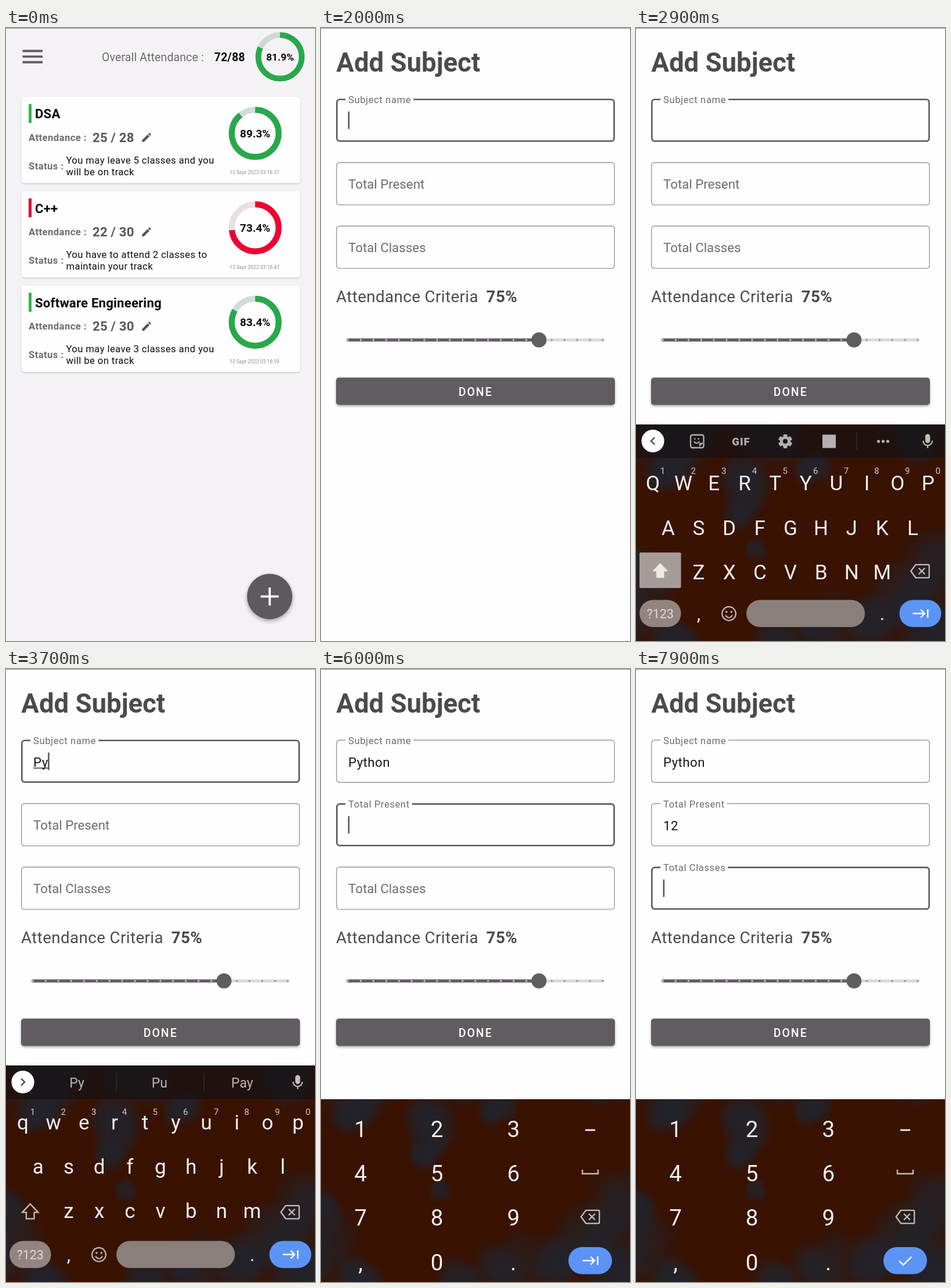
These frames come from a looping animation (532 px wide and 1053 px high, 8 s). An HTML page with a canvas:

```html
<!DOCTYPE html>
<html lang="en">
<head>
<meta charset="utf-8">
<title>Attendance tracker</title>
<style>
  html, body { margin: 0; width: 100%; height: 100%; overflow: hidden; background: #fefdff; }
  canvas { display: block; width: 532px; height: 1053px; }
</style>
</head>
<body>
<canvas id="stage" width="532" height="1053"></canvas>
<script>
const W = 532, H = 1053, LOOP = 8000;
const ctx = document.getElementById('stage').getContext('2d');
const GREY = '#605c5f', GREEN = '#28a84a', RED = '#f00030', KEY = '#f4f0ef', DIM = '#c6bdba';

// Timeline, in ms
const OPEN = 1300, FOCUS_NAME = 1800, KEYBOARD = 2150, FOCUS_PRESENT = 5550, FOCUS_CLASSES = 7550;
const NAME_KEYS = [3250, 3600, 3900, 4150, 4400, 4650];
const PRESENT_KEYS = [6550, 6950];

const progress = (t, start, length) => Math.min(1, Math.max(0, (t - start) / length));
const easeOut = p => 1 - (1 - p) ** 3;
const mix = (a, b, p) => a + (b - a) * p;

function text(str, x, y, size, color, { weight = 400, ls = 0, align = 'left' } = {}) {
  ctx.font = `${weight} ${size}px Roboto, sans-serif`;
  ctx.letterSpacing = ls + 'px';
  ctx.textAlign = align;
  ctx.fillStyle = color;
  ctx.fillText(str, x, y);
  return ctx.measureText(str).width;
}

function box(x, y, w, h, r, color) {
  ctx.beginPath();
  ctx.roundRect(x, y, w, h, r);
  ctx.fillStyle = color;
  ctx.fill();
}

function disc(x, y, r, color) {
  ctx.beginPath();
  ctx.arc(x, y, r, 0, 7);
  ctx.fillStyle = color;
  ctx.fill();
}

function arc(x, y, r, from, to, width, color) {
  ctx.beginPath();
  ctx.arc(x, y, r, from, to);
  ctx.lineWidth = width;
  ctx.strokeStyle = color;
  ctx.stroke();
}

function shadowed(color, blur, dy, draw) {
  ctx.save();
  ctx.shadowColor = color;
  ctx.shadowBlur = blur;
  ctx.shadowOffsetY = dy;
  draw();
  ctx.restore();
}

// Path on a 24-unit grid centred at x, y; stroked when a width is given
function icon(d, x, y, scale, color, width) {
  ctx.save();
  ctx.translate(x, y);
  ctx.scale(scale, scale);
  ctx.translate(-12, -12);
  ctx.fillStyle = ctx.strokeStyle = color;
  ctx.lineWidth = width;
  const path = new Path2D(d);
  width ? ctx.stroke(path) : ctx.fill(path);
  ctx.restore();
}

const PENCIL = 'M3 17.25V21h3.75L17.8 9.95l-3.75-3.75zM20.7 7.05q.7-.7 0-1.4l-2.35-2.35q-.7-.7-1.4 0l-1.8 1.8 3.75 3.75z';
const BACKSPACE = 'M7 4.5H21.5Q22.5 4.5 22.5 5.5V18.5Q22.5 19.5 21.5 19.5H7L1.5 12ZM10.5 8.5l7 7M17.5 8.5l-7 7';
const SHIFT = 'M12 4L4 12.5H8V19H16V12.5H20Z';
const TAB = 'M2.5 12H17.5M12.5 7l5 5-5 5M21.5 6.5V17.5';
const CHECK = 'M4.5 12.5l5 5L20 7';

// ---------- Home screen ----------

function ring(x, y, r, width, value, color, track, size) {
  const top = -Math.PI / 2;
  arc(x, y, r, 0, Math.PI * 2, width, track);
  arc(x, y, r, top, top + Math.PI * 2 * value / 100, width, color);
  text(value.toFixed(1) + '%', x, y + size * 0.355, size, '#0c0c0c', { weight: 700, align: 'center' });
}

const SUBJECTS = [
  ['DSA', '25 / 28', 89.3, 'You may leave 5 classes and you', 'will be on track', '16:37'],
  ['C++', '22 / 30', 73.4, 'You have to attend 2 classes to', 'maintain your track', '16:47'],
  ['Software Engineering', '25 / 30', 83.4, 'You may leave 3 classes and you', 'will be on track', '18:09'],
];

function card([name, count, value, line1, line2, time], top) {
  const low = value < 75;
  ctx.save();
  ctx.translate(0, top);
  shadowed('rgba(0,0,0,.2)', 3, 1.3, () => box(26.5, 0, 480, 148.5, 5, '#fefefe'));
  box(39, 12.5, 5, 32.5, 0, low ? '#e3092f' : '#3cb34a');
  text(name, 50, 37.4, 22.17, '#0c0c0c', { weight: 700, ls: 0.2 });
  const label = { weight: 700, ls: 0.45 };
  text('Attendance :', 39, 76, 16.6, '#6d6b6e', label);
  text(count, 149, 78, 22.17, '#59575a', { weight: 700, ls: 0.2 });
  icon(PENCIL, 242, 70, 0.86, '#59575a');
  text('Status :', 39, 125, 16.6, '#6d6b6e', label);
  text(line1, 103.5, 115, 16.6, '#0c0c0c', { ls: 0.42 });
  text(line2, 103.5, 135, 16.6, '#0c0c0c', { ls: 0.42 });
  ring(429, 63, 40.4, 10.2, value, low ? RED : GREEN, low ? '#e9dfe1' : '#d2dcd6', 19);
  text('13 Sept 2022 03:' + time, 385, 133.3, 8.3, '#8c8a8d', { ls: 0.14 });
  ctx.restore();
}

function home() {
  ctx.fillStyle = '#f4f2f5';
  ctx.fillRect(0, 0, W, H);
  for (const y of [37.6, 47.2, 56.8]) box(28.5, y, 34.5, 3.9, 0, '#605e61');
  text('Overall Attendance :', 165, 57, 19.4, '#6b696c', { ls: 0.18 });
  text('72/88', 358.5, 57, 19.4, '#0c0c0c', { weight: 700, ls: 0.3 });
  ring(471.8, 49.5, 37.4, 9.8, 81.9, GREEN, '#cfd9d3', 17.4);
  SUBJECTS.forEach((subject, i) => card(subject, 118 + i * 162.2, i));
  shadowed('rgba(0,0,0,.35)', 7, 3, () => disc(454, 976.5, 39, '#5d5a5d'));
  box(438.5, 974.6, 31, 3.8, 0, '#fff');
  box(452.1, 961, 3.8, 31, 0, '#fff');
}

// ---------- Form ----------

function field({ label, top, value, focusAt, blurAt, composing, caretFrom }, t) {
  const focused = t >= focusAt && t < blurAt;
  const float = easeOut(progress(t, focusAt, 160));
  const line = focused ? 2.6 : 1.4;
  ctx.beginPath();
  ctx.roundRect(26 + line / 2, top + line / 2, 480 - line, 74 - line, 5);
  ctx.lineWidth = line;
  ctx.strokeStyle = focused ? '#5a585b' : '#98969a';
  ctx.stroke();

  const size = mix(22.25, 16.6, float), ls = 0.6 * float;
  if (float > 0) {
    ctx.font = `400 16.6px Roboto, sans-serif`;
    ctx.letterSpacing = '0.6px';
    const gap = ctx.measureText(label).width + 9;
    box(42 + gap / 2 * (1 - float), top - 1, gap * float, 5, 0, '#fefdff');
  }
  text(label, 47, top + mix(45, 7.6, float), size, '#6d6b6e', { ls });

  let width = 0;
  if (value) {
    width = text(value, 47, top + 46, 22.17, '#161616', { ls: 0.5 });
    if (composing && focused) box(47, top + 48, width, 1.5, 0, '#333');
  }
  if (focused && (t - caretFrom + LOOP) % 1000 < 500) box(46.5 + width, top + 22, 2.6, 30, 0, '#5a585b');
}

function slider() {
  const y = 535.8, thumb = 375.3;
  box(44, y - 2.6, 444, 5.2, 2.6, '#dbd9dc');
  box(44, y - 2.6, thumb - 44, 5.2, 2.6, GREY);
  for (let i = 0; i <= 20; i++) disc(46.4 + i * 21.93, y, 1.6, i < 15 ? '#d4d2d5' : '#8b898c');
  disc(thumb, y, 13, GREY);
}

const typed = (word, times, t) => word.slice(0, times.filter(k => t >= k).length);
const lastBefore = (times, t) => Math.max(...times.filter(k => t >= k));

function form(t, name, present) {
  ctx.fillStyle = '#fefdff';
  ctx.fillRect(0, 0, W, H);
  text('Add Subject', 26.3, 75.3, 45.5, '#4c4a4d', { weight: 700 });
  field({
    label: 'Subject name', top: 121.5, value: name, composing: true,
    focusAt: FOCUS_NAME, blurAt: FOCUS_PRESENT, caretFrom: lastBefore([-60, 1940, ...NAME_KEYS], t),
  }, t);
  field({
    label: 'Total Present', top: 230.6, value: present,
    focusAt: FOCUS_PRESENT, blurAt: FOCUS_CLASSES, caretFrom: lastBefore([0, FOCUS_PRESENT, ...PRESENT_KEYS], t),
  }, t);
  field({
    label: 'Total Classes', top: 339.6, value: '',
    focusAt: FOCUS_CLASSES, blurAt: Infinity, caretFrom: FOCUS_CLASSES,
  }, t);
  text('Attendance Criteria', 26, 471, 27.7, '#4c4a4d', { ls: 0.42 });
  text('75%', 284.6, 471, 27.7, '#4c4a4d', { weight: 700, ls: 0.42 });
  slider();
  shadowed('rgba(0,0,0,.35)', 4, 2, () => box(26, 600.5, 480, 47, 5, GREY));
  text('DONE', 236.8, 632, 19.4, '#fff', { weight: 500, ls: 2 });
}

// ---------- Keyboard ----------

// Soft dark clouds over brown, painted once
const backdrop = (() => {
  const canvas = document.createElement('canvas');
  canvas.width = W;
  canvas.height = H;
  const c = canvas.getContext('2d');
  let seed = 7;
  const random = () => (seed = seed * 16807 % 2147483647) / 2147483647;
  c.fillStyle = '#391202';
  c.fillRect(0, 0, W, H);
  const clouds = [[60, 755, 45], [185, 780, 50], [185, 835, 36], [300, 755, 36], [205, 895, 20],
    [505, 930, 60], [465, 975, 65], [515, 1030, 70], [400, 1020, 55], [320, 1020, 50],
    [15, 930, 42], [5, 1000, 60], [60, 1045, 50], [240, 1045, 40], [60, 700, 90], [220, 700, 70], [470, 700, 60]];
  for (const [x, y, r] of clouds) {
    for (let i = 0; i < 7; i++) {
      const px = x + (random() - 0.5) * r, py = y + (random() - 0.5) * r, pr = r * (0.5 + random() * 0.4);
      const g = c.createRadialGradient(px, py, 0, px, py, pr);
      g.addColorStop(0, 'rgba(34,35,43,.55)');
      g.addColorStop(0.5, 'rgba(34,35,43,.35)');
      g.addColorStop(1, 'rgba(34,35,43,0)');
      c.fillStyle = g;
      c.fillRect(px - pr, py - pr, pr * 2, pr * 2);
    }
  }
  return canvas;
})();

const panel = top => ctx.drawImage(backdrop, 0, top, W, H - top, 0, top, W, H - top);
const key = (str, x, y, size = 35, color = KEY) => text(str, x, y, size, color, { align: 'center' });

function actionKey(x, y, w, path) {
  box(x, y, w, 46.5, 23.2, '#5c94f6');
  icon(path, x + w / 2, y + 23.3, 1.35, '#fff', 1.8);
}

function face(x, y, r, color) {
  disc(x - r * 0.36, y - r * 0.25, r * 0.15, color);
  disc(x + r * 0.36, y - r * 0.25, r * 0.15, color);
  arc(x, y + r * 0.05, r * 0.52, 0.3, Math.PI - 0.3, 2, color);
}

function mic() {
  box(498, 697.5, 8.4, 15.5, 4.2, DIM);
  arc(502.2, 709, 8, 0, Math.PI, 2.2, DIM);
  box(501.1, 717, 2.2, 4.5, 0, DIM);
}

function tools() {
  const c = '#b5afb0';
  ctx.beginPath();
  ctx.roundRect(94, 699, 22.5, 22, 3);
  ctx.lineWidth = 2.3;
  ctx.strokeStyle = c;
  ctx.stroke();
  icon('M23 15L16 22V16Q16 15 17 15Z', 105, 709.5, 1, c);
  face(104.5, 708, 9, c);
  text('GIF', 181, 716.5, 18.5, c, { weight: 900, ls: 1, align: 'center' });
  for (let i = 0; i < 6; i++) {
    ctx.save();
    ctx.translate(257, 710);
    ctx.rotate(i * Math.PI / 3);
    box(-3.4, -12, 6.8, 7, 1, c);
    ctx.restore();
  }
  arc(257, 710, 6.6, 0, 7, 5, c);
  box(321, 698.5, 23, 23, 0, c);
  box(379.5, 695, 1, 30, 0, '#3b3433');
  for (const x of [417.5, 425.5, 433.5]) disc(x, 710, 2.6, c);
}

const SUGGESTIONS = {
  1: ['P', 'Pa', 'Po'], 2: ['Py', 'Pu', 'Pay'], 3: ['Pyt', 'Python', 'Put'],
  4: ['Pyth', 'Python', 'Path'], 5: ['Pytho', 'Python', 'Photo'], 6: ['', 'Python', ''],
};

function suggestions(count) {
  const words = SUGGESTIONS[count];
  words.forEach((word, i) => key(word, 122 + i * 142.3, 719, 23, '#bcb4b3'));
  if (words[0]) for (const x of [189.5, 340.5]) box(x, 694, 1, 31, 0, '#3b3433');
}

function letters(count) {
  const upper = count === 0;
  panel(681);
  ctx.fillStyle = 'rgba(20,18,20,.66)';
  ctx.fillRect(0, 681, W, 58);

  disc(29, 709.5, 19.6, '#fff');
  icon(upper ? 'M15 6l-6 6 6 6' : 'M9 6l6 6-6 6', 29, 709.5, 1, '#444', 2.3);
  upper ? tools() : suggestions(count);
  mic();

  const rows = [['qwertyuiop', 29], ['asdfghjkl', 55.3], ['zxcvbnm', 108]];
  rows.forEach(([row, left], r) => [...row].forEach((ch, i) => {
    const x = left + i * 52.65, y = (upper ? 794.3 : 791) + r * 76.2;
    key(upper ? ch.toUpperCase() : ch, x, y);
    if (r === 0) key(String((i + 1) % 10), x + 17, 765.5, 15, '#d3cac7');
  }));

  if (upper) {
    box(6, 901, 71.5, 61, 2, '#a59b98');
    icon(SHIFT, 41.7, 932.5, 1.7, '#efe9e7');
  } else {
    icon(SHIFT, 41.7, 932.5, 1.7, DIM, 1.35);
  }
  icon(BACKSPACE, 489, 933, 1.5, DIM, 1.5);

  box(6, 982.5, 71.5, 46.5, 23.2, '#92847f');
  key('?123', 41.7, 1014, 21.5, '#e2dad7');
  key(',', 108, 1017, 32);
  arc(160, 1006, 11.8, 0, 7, 2.2, DIM);
  face(160, 1006, 11.8, DIM);
  box(190, 982.5, 204, 46.5, 23.2, '#8b7f7b');
  key('.', 424, 1017, 32);
  actionKey(453.5, 982.5, 72, TAB);
}

function numbers(last) {
  panel(739);
  ['123', '456', '789', ',0.'].forEach((row, r) => [...row].forEach((ch, i) => {
    key(ch, 68 + i * 131.6, 803.7 + r * 76.3, 38.5);
  }));
  box(455, 790.6, 17, 2.8, 0, KEY);
  ctx.beginPath();
  ctx.moveTo(450, 860);
  ctx.lineTo(450, 867);
  ctx.lineTo(477, 867);
  ctx.lineTo(477, 860);
  ctx.lineWidth = 2.4;
  ctx.strokeStyle = DIM;
  ctx.stroke();
  icon(BACKSPACE, 463.5, 941, 1.5, DIM, 1.5);
  actionKey(426, 993, 75, last ? CHECK : TAB);
}

// ---------- Playback ----------

function draw(t) {
  const name = typed('Python', NAME_KEYS, t);
  const present = typed('12', PRESENT_KEYS, t);
  const opened = progress(t, OPEN, 200);
  ctx.clearRect(0, 0, W, H);
  if (opened < 1) home();
  if (opened > 0) {
    ctx.globalAlpha = opened;
    form(t, name, present);
    ctx.globalAlpha = 1;
  }
  if (t >= FOCUS_PRESENT) {
    numbers(t >= FOCUS_CLASSES);
  } else if (t >= KEYBOARD) {
    ctx.save();
    ctx.translate(0, 372 * (1 - easeOut(progress(t, KEYBOARD, 280))));
    letters(name.length);
    ctx.restore();
  }
  box(0, 0, W, 1, 0, '#858386');
}

function tick() {
  draw(performance.now() % LOOP);
  requestAnimationFrame(tick);
}
tick();
</script>
</body>
</html>
```
